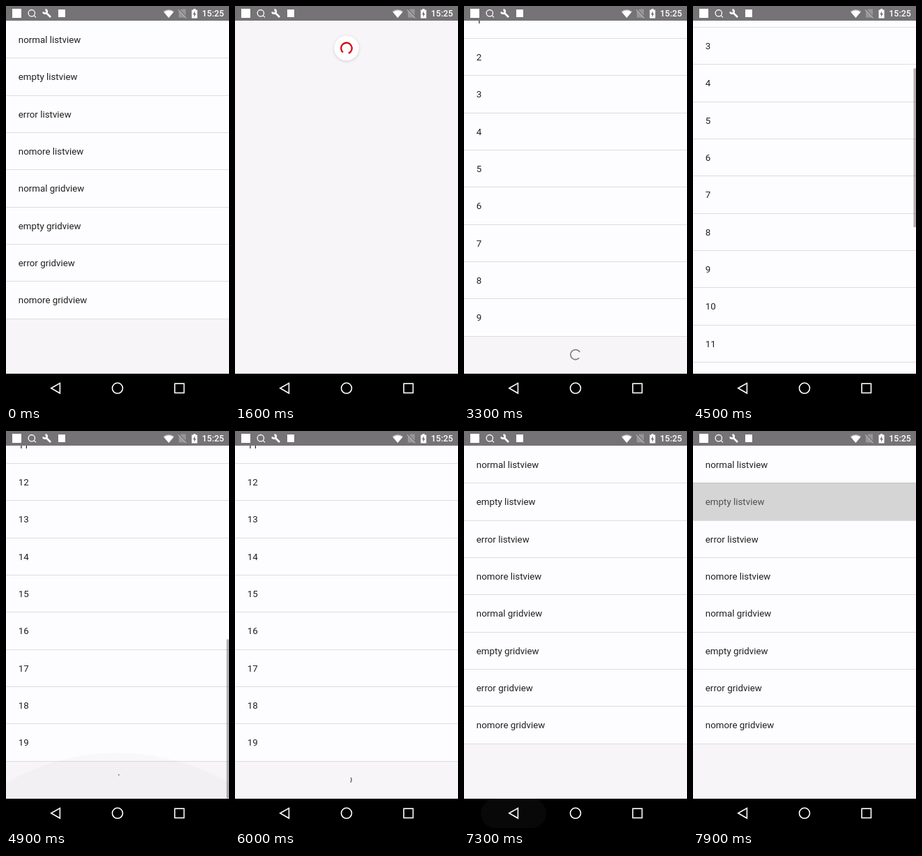
These frames come from a looping animation (320x569 px, 8 s). An HTML page with a canvas:

```html
<!DOCTYPE html>
<html lang="en">
<head>
<meta charset="utf-8">
<title>List demo</title>
<style>
html, body { margin: 0; width: 100%; height: 100%; overflow: hidden; background: #000; }
canvas { display: block; width: 320px; height: 569px; }
</style>
</head>
<body>
<canvas id="stage"></canvas>
<script>
const W = 320, H = 569, LOOP = 8000, STEP = 100;
const TOP = 64 / 3, ROW = 160 / 3, BOTTOM = 526.33, VIEW = BOTTOM - TOP;
const BAR = 21, NAV = 527;
const BG = '#f7f5f8', PAPER = '#fdfcfe', LINE = '#dedcdf', INK = '#212121';
const MENU = ['listview', 'gridview'].flatMap(v =>
  ['normal', 'empty', 'error', 'nomore'].map(k => k + ' ' + v));

const canvas = document.getElementById('stage');
const ctx = canvas.getContext('2d');
const dpr = window.devicePixelRatio || 1;
canvas.width = W * dpr;
canvas.height = H * dpr;

const clamp = v => Math.max(0, Math.min(1, v));
const ease = v => 0.5 - 0.5 * Math.cos(Math.PI * clamp(v));
const rad = d => d * Math.PI / 180;
const snap = y => Math.floor(y + 0.01);

function rect(x, y, w, h, color) {
  ctx.fillStyle = color;
  ctx.fillRect(x, y, w, h);
}

function disc(x, y, r, color) {
  ctx.fillStyle = color;
  ctx.beginPath();
  ctx.arc(x, y, r, 0, 7);
  ctx.fill();
}

function poly(points, close = true) {
  ctx.beginPath();
  points.forEach(([x, y]) => ctx.lineTo(x, y));
  if (close) ctx.closePath();
}

function row(label, y) {
  const top = snap(y) + 1, end = snap(y + ROW);
  rect(0, top, W, end - top, PAPER);
  rect(0, end, W, 1, LINE);
  ctx.fillStyle = INK;
  ctx.font = '13.33px Roboto, sans-serif';
  ctx.fillText(label, 17.8, Math.round(y + ROW / 2 + 4.9));
}

// Arc that grows for half a cycle and shrinks for the other half
function spinner(x, y, r, width, color, age, phase) {
  const c = age / 1332, k = Math.floor(c), f = c - k;
  const turn = 216 * c + 288 * k + phase;
  const from = turn + 288 * ease(f * 2 - 1);
  const to = turn + 288 * ease(f * 2) + 10;
  ctx.strokeStyle = color;
  ctx.lineWidth = width;
  ctx.beginPath();
  ctx.arc(x, y, r, rad(from), rad(to));
  ctx.stroke();
}

function refreshBadge(t) {
  const scale = t < 2100 ? 1 : 1 - (t - 2050) / 200;
  if (scale <= 0) return;
  ctx.save();
  ctx.translate(160, 60.5);
  ctx.scale(scale, scale);
  ctx.shadowColor = 'rgba(0,0,0,.16)';
  ctx.shadowBlur = 4 * dpr;
  ctx.shadowOffsetY = dpr;
  disc(0, 0, 17.8, '#fff');
  ctx.shadowColor = 'transparent';
  spinner(0, 0, 7.8, 2.3, '#d8000f', t - 934, 22);
  ctx.restore();
}

function menuPage(t) {
  rect(0, BAR, W, NAV - BAR, BG);
  MENU.forEach((label, i) => row(label, TOP + i * ROW));
  if (t >= 7900) rect(0, 74, W, 54, 'rgba(153,153,153,.4)');
}

function scrollAt(t) {
  if (t < 2500) return 0;
  if (t < 4500) return Math.min(10 * ROW - VIEW, 13.3 + 0.151 * (t - 2500));
  const u = t - 4500;
  return u > 1000 ? 20 * ROW - VIEW
    : Math.min(20 * ROW - VIEW, 97.5 + 1.6 * u - 0.0005 * u * u);
}

function glow(age) {
  if (age < 0 || age >= 500) return;
  const h = 65 * (1 - (age / 600) ** 2);
  disc(160, BOTTOM - h + W, W, `rgba(0,0,0,${0.018 * (1 - age / 500)})`);
}

function listPage(t) {
  rect(0, BAR, W, NAV - BAR, BG);
  if (t >= 2100) {
    const count = t < 3900 ? 9 : t < 6200 ? 19 : 29;
    const s = scrollAt(t);
    const first = Math.floor(s / ROW);
    for (let i = first; i < Math.min(count, first + 11); i++) {
      row(String(i + 1), TOP + i * ROW - s);
    }

    // The second half of each load cycle starts at the list end
    const second = t >= 4500;
    const began = second ? 4850 : 2550, ended = second ? 4900 : 2600;
    const footer = TOP + count * ROW - s;
    if (t >= began && footer < BOTTOM) {
      spinner(160, footer + ROW / 2, 7.1, 1.8, '#858487', t - began, -90);
    }
    glow(t - ended);

    const alpha = t < 2500 || (t >= 3300 && t < 4500) ? 0 : 1 - clamp((t - ended - 400) / 250);
    const unit = VIEW / ((count + 2) * ROW);
    rect(316.5, TOP + (s + ROW) * unit, 3.5, VIEW * unit, `rgba(0,0,0,${0.31 * alpha})`);
  }
  refreshBadge(t);
}

function wifi(scale, color) {
  ctx.save();
  ctx.translate(233.5, 17);
  ctx.scale(scale, scale);
  ctx.fillStyle = color;
  ctx.beginPath();
  ctx.moveTo(0, 0);
  ctx.lineTo(-8, -9.5);
  ctx.quadraticCurveTo(0, -15, 8, -9.5);
  ctx.fill();
  ctx.restore();
}

function statusBar() {
  rect(0, 0, W, BAR, '#757375');
  rect(9, 4, 13, 13, '#fff');
  rect(75, 5, 10, 11, '#fff');

  ctx.strokeStyle = '#fff';
  ctx.lineWidth = 1.3;
  ctx.beginPath();
  ctx.arc(36.8, 10.2, 4.7, 0, 7);
  ctx.moveTo(40.2, 13.6);
  ctx.lineTo(43, 16.4);
  ctx.stroke();

  // wrench
  ctx.lineWidth = 2.7;
  ctx.beginPath();
  ctx.arc(56, 8, 2.7, rad(-80), rad(170));
  ctx.moveTo(57.5, 9.5);
  ctx.lineTo(64, 16);
  ctx.stroke();

  wifi(1, '#a3a2a3');
  wifi(0.87, '#fff');

  // no sim
  ctx.fillStyle = '#979697';
  poly([[248, 8], [251.5, 4.5], [258, 4.5], [258, 16.5], [248, 16.5]]);
  ctx.fill();
  ctx.lineWidth = 1.2;
  ctx.strokeStyle = '#757375';
  poly([[248, 4.5], [259.5, 16.5]], false);
  ctx.stroke();
  ctx.strokeStyle = '#b5b4b5';
  poly([[247, 5.3], [258.5, 17.3]], false);
  ctx.stroke();

  // battery
  rect(266.5, 5.5, 8, 12, '#fff');
  rect(269, 4, 3, 2, '#fff');
  ctx.fillStyle = '#757375';
  poly([[271.2, 7], [268.2, 12.2], [270, 12.2], [269.8, 16], [272.8, 10.7], [271, 10.7]]);
  ctx.fill();

  ctx.fillStyle = '#fff';
  ctx.font = '500 12.44px Roboto, sans-serif';
  ctx.fillText('15:25', 281.3, 15);
}

function navBar(t) {
  rect(0, NAV, W, H - NAV, '#000');
  if (t >= 6900 && t < 7400) {
    const a = t < 7000 ? 0.09 : 0.13 * (7400 - t) / 400;
    ctx.fillStyle = `rgba(255,255,255,${a})`;
    ctx.beginPath();
    ctx.roundRect(24, NAV, 94, H - NAV, 21);
    ctx.fill();
  }
  ctx.strokeStyle = '#fff';
  ctx.lineWidth = 1.6;
  ctx.lineJoin = 'miter';
  poly([[64.8, 547.8], [77.4, 540.6], [77.4, 555]]);
  ctx.stroke();
  ctx.beginPath();
  ctx.arc(160, 547.8, 7.5, 0, 7);
  ctx.stroke();
  ctx.strokeRect(242.2, 541.2, 13.3, 13.3);
}

function openness(t) {
  if (t < 600) return 0;
  return t < 6900 ? ease((t - 575) / 400) : 1 - ease((t - 6858) / 350);
}

function shifted(x, draw, t) {
  ctx.save();
  ctx.translate(Math.round(x), 0);
  draw(t);
  ctx.restore();
}

function render(t) {
  ctx.setTransform(dpr, 0, 0, dpr, 0, 0);
  const p = openness(t);
  if (p < 1) shifted(-0.3 * W * p, menuPage, t);
  if (p > 0) shifted(W * (1 - p), listPage, t);
  statusBar();
  navBar(t);
}

const start = performance.now();
function tick() {
  const t = (performance.now() - start) % LOOP;
  render(Math.floor(t / STEP) * STEP);
  requestAnimationFrame(tick);
}
tick();
</script>
</body>
</html>
```
